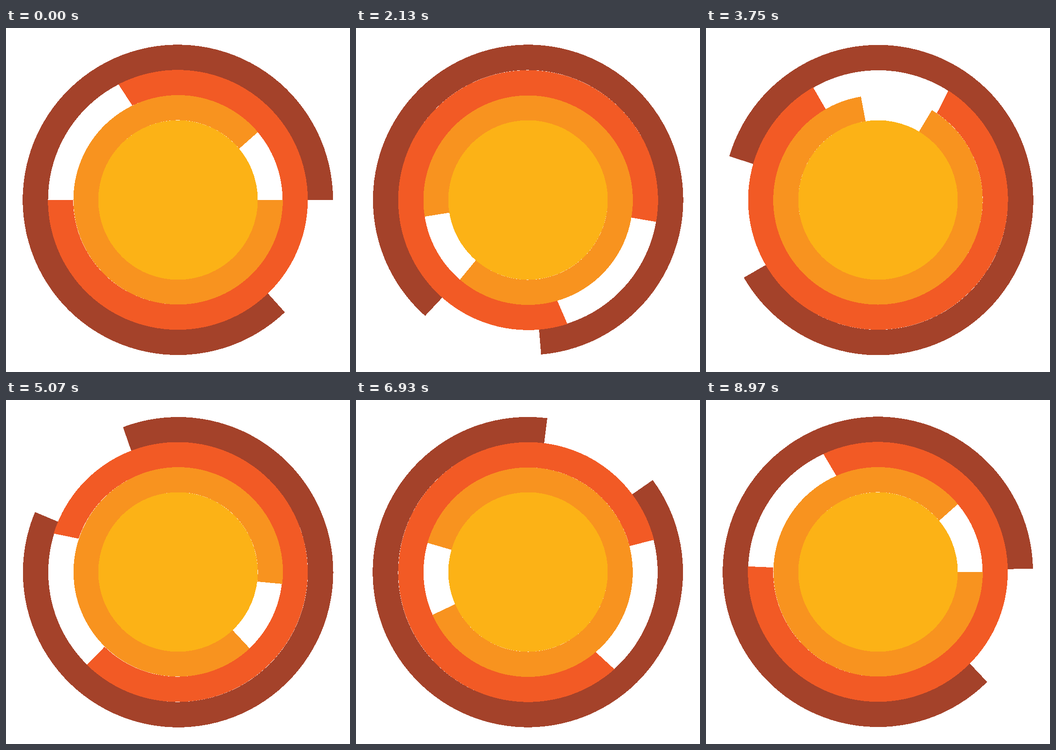
An HTML page for the animation above (9 s loop, 748x748 px).

```html
<!DOCTYPE html>
<html lang="en">
<head>
<meta charset="utf-8">
<title>Rotating rings</title>
<style>
  html, body { margin: 0; width: 100%; height: 100%; overflow: hidden; background: #fff; }
  svg { display: block; width: 748px; height: 748px; shape-rendering: crispEdges; }
</style>
</head>
<body>
<svg id="stage" viewBox="0 0 748 748"></svg>
<script>
const STEP = 30, STEPS = 300;
const stage = document.getElementById('stage');

// from / to: edges of the coloured arc in degrees, each as [outer, inner];
// turn: degrees per step; shift: arc centre relative to its pivot
const rings = [
  { color: '#A4422A', outer: 337.4, inner: 282.2, from: [46.4, 46.1], to: [360, 360],
    turn: 360 / STEPS, pivot: [374, 374], shift: [-0.3, -0.3] },
  { color: '#F25A25', outer: 282.5, inner: 227.6, from: [242.8, 244.2], to: [540, 540],
    turn: -720 / STEPS, pivot: [374, 374], shift: [-0.3, -0.3] },
  { color: '#F8931F', outer: 227.7, inner: 173.2, from: [0, 0], to: [319.65, 320.05],
    turn: 720 / (STEPS - 1), pivot: [374.2, 374], shift: [0, -0.35] }
];

function add(tag, attrs) {
  const el = document.createElementNS('http://www.w3.org/2000/svg', tag);
  for (const name in attrs) el.setAttribute(name, attrs[name]);
  return stage.appendChild(el);
}

function ringPath({ outer, inner, from, to, pivot, shift }) {
  const point = (r, deg) => {
    const a = deg * Math.PI / 180;
    return [pivot[0] + shift[0] + r * Math.cos(a), pivot[1] + shift[1] + r * Math.sin(a)]
      .map(v => v.toFixed(3)).join(' ');
  };
  return `M${point(outer, from[0])} A${outer} ${outer} 0 1 1 ${point(outer, to[0])} ` +
    `L${point(inner, to[1])} A${inner} ${inner} 0 1 0 ${point(inner, from[1])} Z`;
}

for (const ring of rings) ring.el = add('path', { d: ringPath(ring), fill: ring.color });
add('circle', { cx: 374.1, cy: 374, r: 173.4, fill: '#FCB216' });

function draw(time) {
  const step = Math.floor(Math.max(0, time) / STEP) % STEPS;
  for (const { el, turn, pivot } of rings) {
    el.setAttribute('transform', `rotate(${step * turn} ${pivot.join(' ')})`);
  }
}

const start = performance.now();
function tick() {
  draw(performance.now() - start);
  requestAnimationFrame(tick);
}
tick();
</script>
</body>
</html>
```
